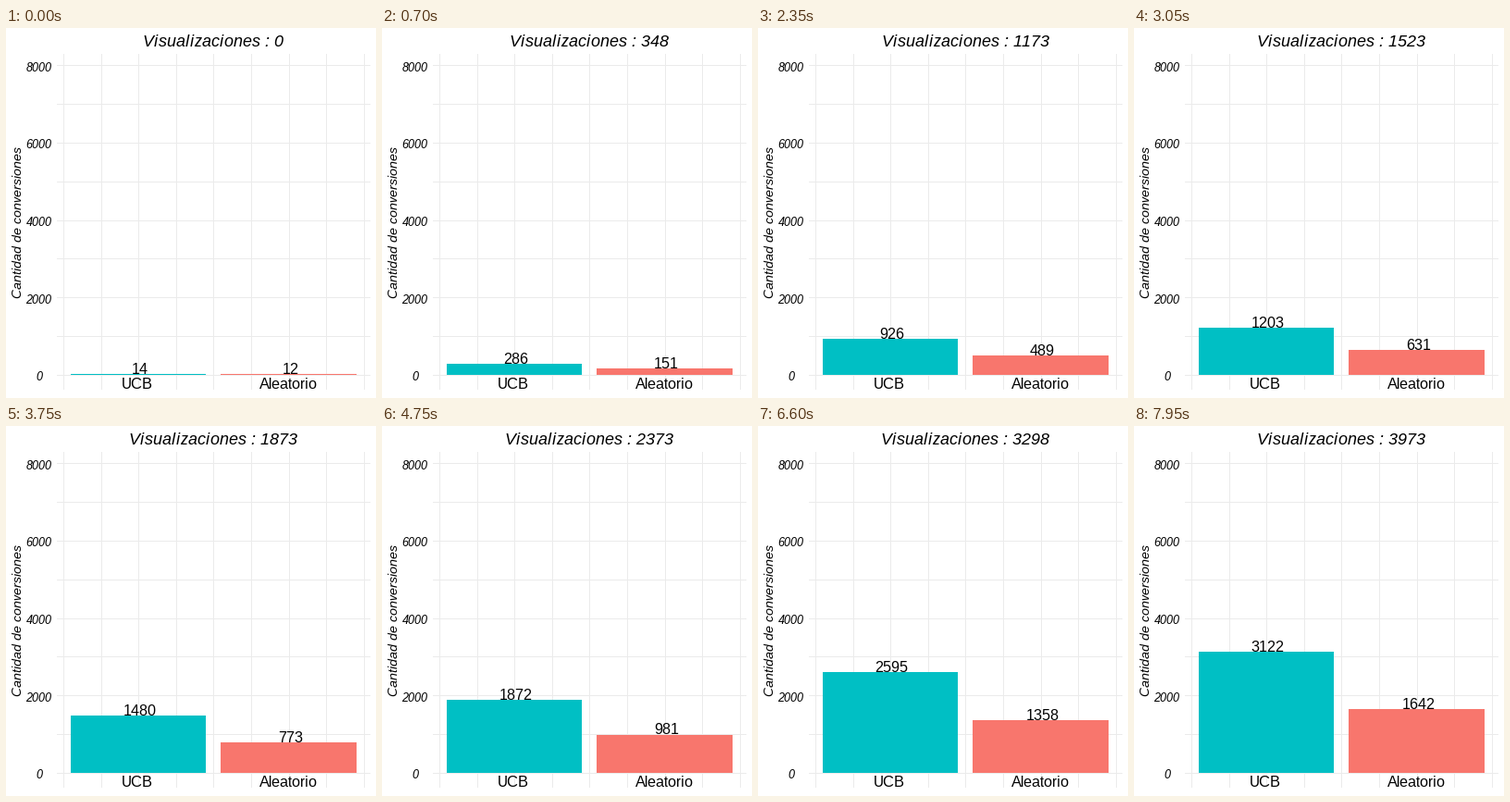
Recreate the animation shown at these times as a matplotlib script. Size 400 by 400 pixels, loop 8 s.

```python
import math

import numpy as np
import matplotlib.pyplot as plt
from matplotlib.animation import FuncAnimation
from matplotlib.patches import Rectangle

plt.rcParams.update({
    "font.family": "Liberation Sans",
    "text.hinting": "native",
    "text.hinting_factor": 1,
    "toolbar": "None",
})

SIZE, DPI = 400, 100
FRAMES, INTERVAL = 160, 50
BASE, SCALE = 375.2, 0.0418      # pixel row of zero, pixels per conversion
FLOOR = 375
GRID = "#EBEBEB"

# Running totals at a few frames; growth is nearly linear between them
KEYS = [0, 28, 47, 75, 116, 132, 159]
UCB = [14, 559, 926, 1480, 2283, 2595, 3122]
RANDOM = [12, 290, 489, 773, 1200, 1358, 1642]

fig = plt.figure(figsize=(SIZE / DPI, SIZE / DPI), dpi=DPI, facecolor="white")
ax = fig.add_axes([0, 0, 1, 1])
ax.set_xlim(0, SIZE)
ax.set_ylim(SIZE, 0)
ax.axis("off")


def height_at(value):
    return BASE - value * SCALE


def box(x, y, w, h, color, z=1):
    return ax.add_patch(Rectangle((x, y), w, h, fc=color, lw=0,
                                  antialiased=False, zorder=z))


def label(x, y, text, px, **kw):
    return ax.text(x, y, text, fontsize=px * 72 / DPI, color="black",
                   ha="center", va="baseline", zorder=4, **kw)


for value in range(0, 9000, 1000):
    box(55, math.floor(height_at(value)), 339, 1, GRID)
for i in range(9):
    box(round(62 + 40.6 * i), 28, 1, 363, GRID)

for value in range(0, 10000, 2000):
    label(35.5, round(height_at(value) + 6), str(value), 13, style="italic")
label(17, 210, "Cantidad de conversiones", 14, style="italic",
      rotation=90, rotation_mode="anchor")
label(142, 390, "UCB", 16)
label(305.5, 390, "Aleatorio", 16)

title = label(224, 20, "", 18, style="italic")
bars = [
    (box(70, FLOOR, 146, 0, "#00BFC4", 2), label(144.5, FLOOR, "", 16), UCB),
    (box(232, FLOOR, 147, 0, "#F8766D", 2), label(307.5, FLOOR, "", 16), RANDOM),
]


def draw(i):
    artists = [title]
    title.set_text(f"Visualizaciones : {max(0, 25 * i - 2)}")
    for bar, count, totals in bars:
        value = int(round(np.interp(i, KEYS, totals)))
        top = height_at(value)
        bar.set_y(math.floor(top))
        bar.set_height(FLOOR - math.floor(top))
        count.set_text(str(value))
        count.set_y(math.floor(top - 0.2))
        artists += [bar, count]
    return artists


anim = FuncAnimation(fig, draw, frames=FRAMES, interval=INTERVAL,
                     repeat=True, repeat_delay=0, blit=False)
plt.show()
```
